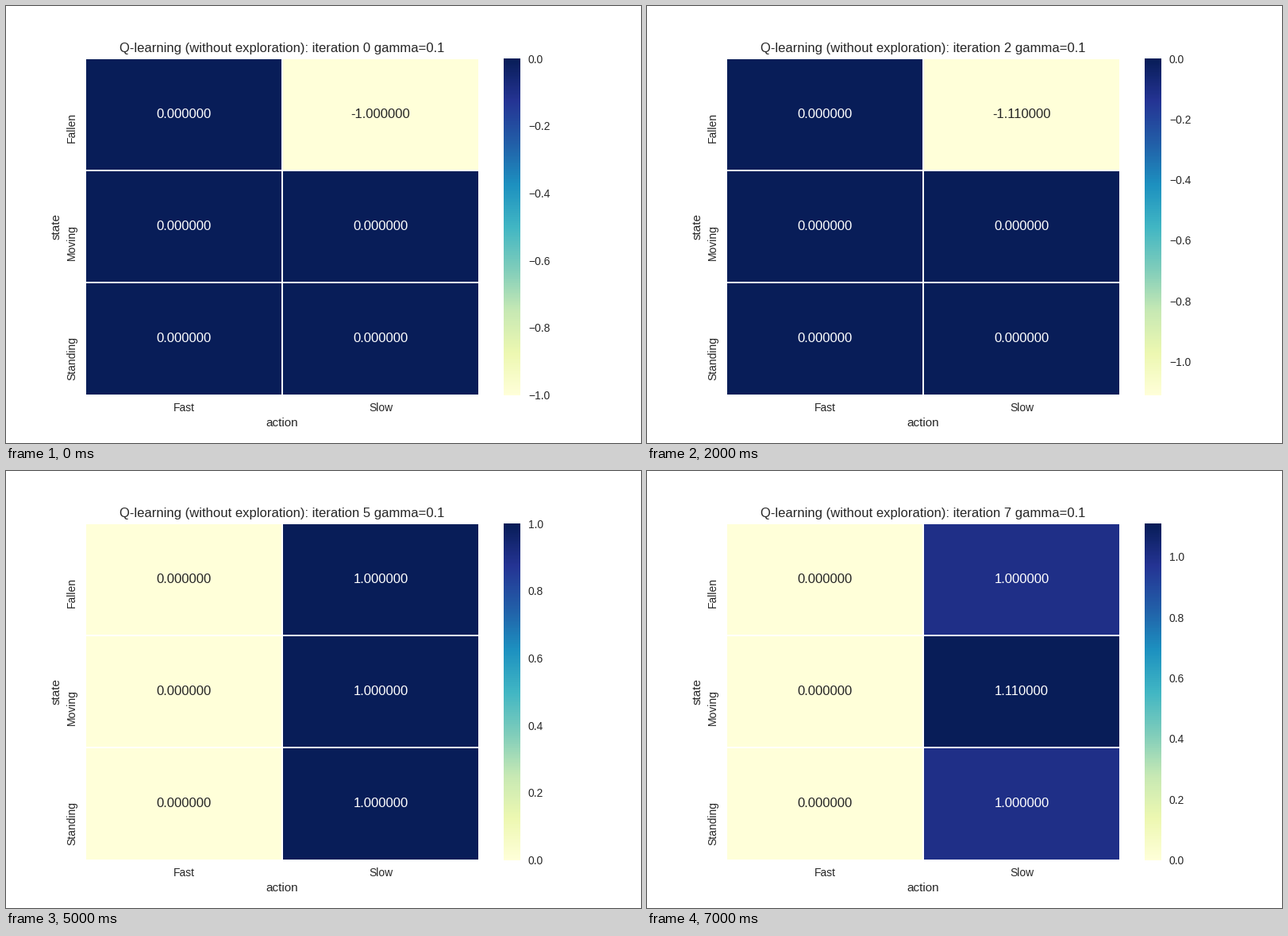
A matplotlib script for the animation above (8000 ms loop, 800 by 550 pixels).

```python
import numpy as np
import matplotlib.pyplot as plt
from matplotlib.animation import FuncAnimation
from matplotlib.patches import Rectangle

plt.rcParams["font.family"] = "Liberation Sans"
plt.rcParams["text.color"] = "0.15"

W, H, DPI = 800, 550, 100
LEFT, TOP, RIGHT, BOTTOM = 100, 66, 596, 489.5
CELL_W, CELL_H = (RIGHT - LEFT) / 2, (BOTTOM - TOP) / 3
STATES = ["Fallen", "Moving", "Standing"]
ACTIONS = ["Fast", "Slow"]
CMAP = plt.get_cmap("YlGnBu")
MINUS = "\u2212"

# Q-values of the "Slow" action per iteration; "Fast" stays at zero
SLOW = [
    (-1, 0, 0), (-1.1, 0, 0), (-1.11, 0, 0), (1, 0, 0),
    (1, 0, 1), (1, 1, 1), (1, 1.1, 1), (1, 1.11, 1),
]

fig = plt.figure(figsize=(W / DPI, H / DPI), dpi=DPI, facecolor="white")
ax = fig.add_axes([0, 0, 1, 1])
ax.axis("off")


def label(x, y, text="", size=10, ha="center", va="center", **kw):
    return ax.text(x, y, text, fontsize=size, ha=ha, va=va, **kw)


# Colour bar
ax.imshow(np.linspace(1, 0, 256)[:, None], cmap=CMAP, vmin=0, vmax=1,
          extent=(627, 648, 490, 66), aspect="auto", interpolation="nearest")
ax.set_xlim(0, W)
ax.set_ylim(H, 0)

# Cells, separated by two white pixels
cells = {}
x_spans = [(101, 347), (349, 595)]
y_spans = [(67, 206), (208, 347), (349, 489)]
for row, (y0, y1) in enumerate(y_spans):
    for col, (x0, x1) in enumerate(x_spans):
        box = Rectangle((x0, y0), x1 - x0, y1 - y0, lw=0, antialiased=False)
        ax.add_patch(box)
        note = label(LEFT + (col + 0.5) * CELL_W, TOP + (row + 0.5) * CELL_H, size=12)
        cells[row, col] = box, note

# Axis labels
for row, name in enumerate(STATES):
    label(90.3, TOP + (row + 0.5) * CELL_H - 3, name, ha="right", va="top", rotation=90)
for col, name in enumerate(ACTIONS):
    label(LEFT + (col + 0.5) * CELL_W, 499.2, name, va="top")
label(348, 518.3, "action", size=11, va="top")
label(71, (TOP + BOTTOM) / 2, "state", size=11, ha="right", rotation=90)

title = label(348, 57.7, size=12, va="baseline")
ticks = [label(657.9, TOP, ha="left", va="center_baseline") for _ in range(6)]


def update(step):
    slow = SLOW[step]
    lo, hi = min(0, *slow), max(0, *slow)
    title.set_text(f"Q-learning (without exploration): iteration {step} gamma=0.1")

    for (row, col), (box, note) in cells.items():
        value = slow[row] if col else 0
        level = (value - lo) / (hi - lo)
        box.set_facecolor(CMAP(float(level)))
        note.set_text(f"{value:.6f}")
        note.set_color("white" if level > 0.5 else "0.15")

    sign = -1 if lo < 0 else 1
    for i, tick in enumerate(ticks):
        value = sign * i / 5
        tick.set_y(TOP + (hi - value) / (hi - lo) * (BOTTOM - TOP))
        tick.set_text((MINUS if value < 0 else "") + f"{abs(value):.1f}")
    return []


anim = FuncAnimation(fig, update, frames=len(SLOW), interval=1000, repeat=True)
plt.show()
```
